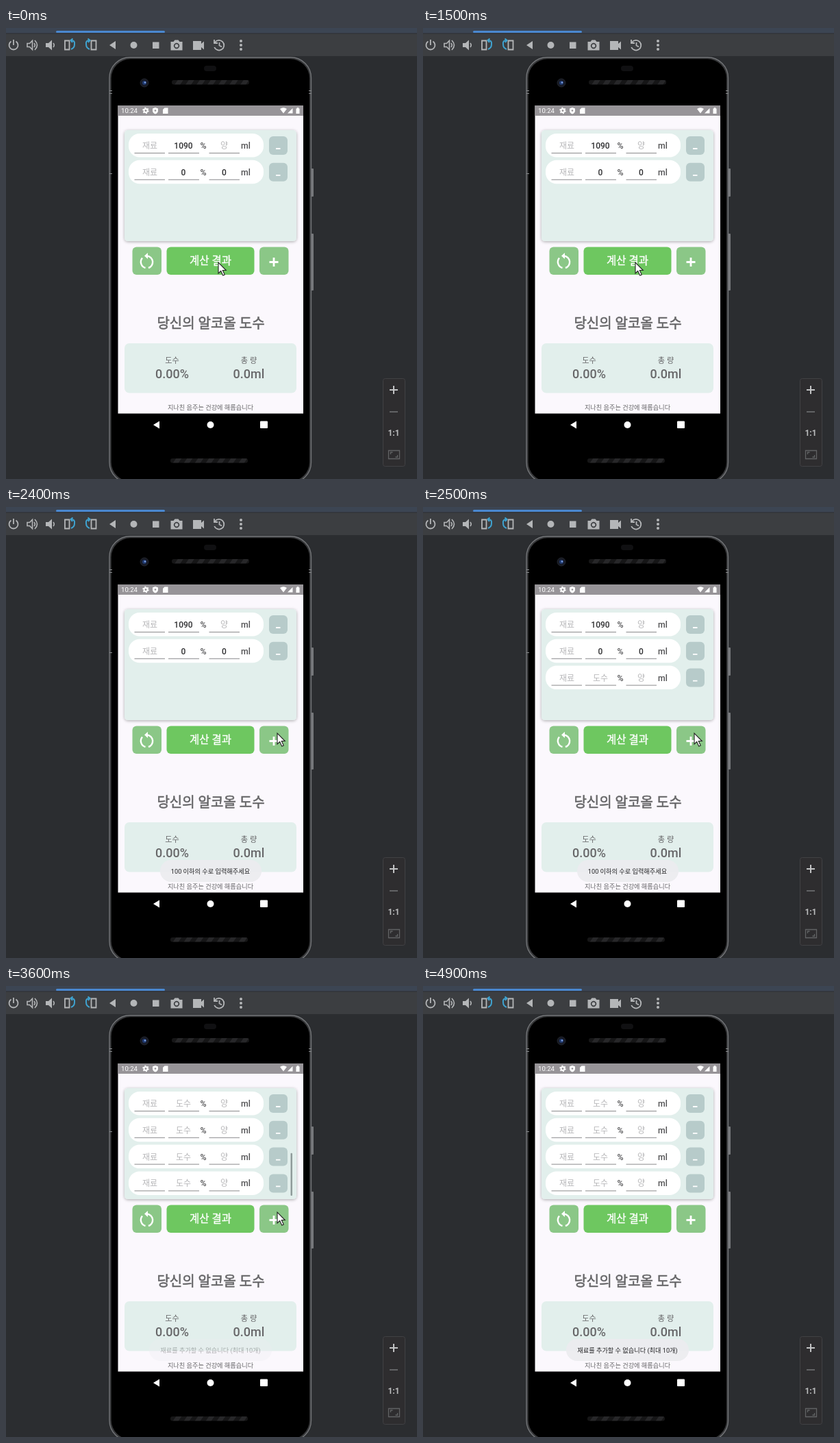
An HTML page for the animation above (5000 ms loop, 600x658 px).

```html
<!DOCTYPE html>
<html lang="ko">
<head>
<meta charset="utf-8">
<style>
html, body { margin: 0; width: 100%; height: 100%; overflow: hidden; background: #2b2d30; }
svg { display: block; }
text { font-family: Roboto, 'Noto Sans CJK KR', 'Noto Sans CJK', sans-serif; text-anchor: middle; }
.card { fill: #e2efec; }
.tools { fill: none; stroke: #b4b6b8; stroke-width: 1.8; }
.tools .solid { fill: #b4b6b8; stroke: none; }
.tools .blue { stroke: #3fa3d0; stroke-width: 2; }
.hint { fill: #b7b7b9; font-size: 12px; }
.num { fill: #303032; font-size: 12px; font-weight: 500; }
.unit { fill: #505052; font-size: 12.3px; font-weight: 500; text-anchor: start; }
.grey { fill: #676769; }
.toast { font-size: 9.2px; fill: #252527; }
</style>
</head>
<body>
<svg width="600" height="658" viewBox="0 0 600 658">
  <defs>
    <filter id="shade" x="-5%" y="-5%" width="110%" height="112%">
      <feDropShadow dx="0" dy="1" stdDeviation="2.2" flood-opacity=".32"/>
    </filter>
    <pattern id="mesh" width="16" height="7" patternUnits="userSpaceOnUse" patternTransform="skewX(-35)">
      <rect width="16" height="7" fill="#161617"/><rect width="8" height="7" fill="#272729"/>
    </pattern>
    <clipPath id="list"><rect x="173" y="149" width="251" height="162" rx="5"/></clipPath>
  </defs>

  <rect width="600" height="658" fill="#2b2d30"/>
  <rect width="600" height="8" fill="#3c4553"/>
  <rect y="8" width="600" height="33" fill="#3c3e41"/>
  <rect y="7.5" width="600" height="1" fill="#2d2f32"/>
  <rect x="73" y="4" width="159" height="3" rx="1.5" fill="#4a88d0"/>

  <g class="tools">
    <path d="M7.500 19.500a6.500 6.500 0 1 0 7 0M11 17v8"/>
    <path d="M31 22.500h3.500l4-4v13l-4-4h-3.500z" stroke-width="1.600"/>
    <path class="solid" d="M58 22h4l5-4.500v15l-5-4.500h-4z"/>
    <path d="M41 22q2.500 3 0 6M42 18q7 7 0 14M69 22q2.500 3 0 6" stroke-width="1.600"/>
    <path d="M86 18.500h6.500v13h-6.500zM124.500 18.500h7v13h-7z"/>
    <path class="blue" d="M95 18q6 0 5 6 0 5-5 7M97 21l-2.500-3 3-2.500M122 18q-6 0-5 6 0 5 5 7M120 21l2.500-3-3-2.500"/>
    <path class="solid" d="M151 25l9-6v12zM214 20.500h9.500v9.500h-9.500z"/>
    <circle class="solid" cx="186.500" cy="25" r="5"/>
    <path class="solid" fill-rule="evenodd" d="M240.500 20h4l2-2.500h5l2 2.500h4v12.500h-17zM249 21.800a4.200 4.200 0 1 0 .1 0z"/>
    <circle class="solid" cx="249" cy="26" r="2.500"/>
    <path class="solid" d="M273 19h12v4l4-3.500v12l-4-3.500v4h-12z"/>
    <path d="M305 21a7.300 7.300 0 1 1-.8 7M304 17v5h5M311.500 21v4.500l3.500 2"/>
    <g class="solid"><circle cx="343" cy="19" r="2"/><circle cx="343" cy="25" r="2"/><circle cx="343" cy="31" r="2"/></g>
  </g>

  <!-- phone -->
  <g fill="#77797c">
    <rect x="445.500" y="205" width="3.500" height="41" rx="1"/>
    <rect x="445.500" y="300" width="3.500" height="83" rx="1"/>
  </g>
  <rect x="151" y="42.800" width="294.500" height="621" rx="30" fill="#37383a" stroke="#727477" stroke-width="1.400"/>
  <rect x="153.700" y="45.300" width="289.300" height="616" rx="28" fill="#000"/>
  <path d="M151 91.500h4M151 95.500h4M442 91.500h4M442 95.500h4M151 212.500h4" stroke="#8b8d8f"/>
  <rect x="289" y="55" width="18" height="8" rx="4" fill="#101012"/>
  <circle cx="202" cy="80" r="6" fill="#171a24" stroke="#22252d"/>
  <circle cx="202" cy="80" r="3" fill="#203a70"/><circle cx="203" cy="79.500" r="1.300" fill="#81a5e5"/>
  <rect x="242" y="76" width="113" height="6.500" rx="3" fill="url(#mesh)"/>
  <rect x="240" y="628" width="113" height="6.500" rx="3" fill="url(#mesh)"/>

  <!-- screen -->
  <rect x="163.500" y="113" width="270.500" height="449.500" fill="#fbf8fd"/>
  <rect x="163.500" y="113" width="270.500" height="15" fill="#979498"/>
  <text x="180" y="124.300" font-size="9.600" fill="#fff">10:24</text>
  <g fill="#fff">
    <circle cx="204" cy="120.500" r="2.500" fill="none" stroke="#fff" stroke-width="2"/>
    <circle cx="204" cy="120.500" r="4" fill="none" stroke="#fff" stroke-width="1.500" stroke-dasharray="2 2.190"/>
    <path d="M218 116l4 1.500v3q0 3.500-4 5-4-1.500-4-5v-3zM231.500 116.500h5v8.500h-7.500v-6zM400 118q5-3.500 10 0l-5 6.500zM411 124.500l7.500-7.500v7.500zM423.500 117.500h1.200v-1.200h2.600v1.200h1.200v7.500h-5z"/>
    <circle cx="218" cy="120.500" r="1.300" fill="#979498"/>
    <path d="M215 579l9-5.500v11z"/><circle cx="298.500" cy="579" r="5"/><rect x="371" y="573.500" width="11" height="10.500" rx="1"/>
  </g>
  <rect class="card" x="173" y="149" width="251" height="162" rx="5" filter="url(#shade)"/>
  <g id="rows" clip-path="url(#list)"></g>
  <rect id="bar" x="415.500" width="2.500" rx="1" fill="#8f9c9b"/>

  <rect x="184.500" y="319.500" width="42.500" height="40.500" rx="6" fill="#8bc787"/>
  <rect x="234.500" y="319.500" width="128" height="40.500" rx="6" fill="#6ec760"/>
  <rect x="370" y="319.500" width="42.500" height="40.500" rx="6" fill="#8bc787"/>
  <g fill="none" stroke="#fff" stroke-width="2.400">
    <path d="M206 332.500a9 9 0 0 1 2 17.500M203.500 350a9 9 0 0 1-4.500-14.500"/>
    <path d="M384.500 341.500h13M391 335v13" stroke-width="2.800"/>
  </g>
  <path d="M207 328v9l-5-4.500z" fill="#fff"/>
  <text x="298.500" y="344.500" font-size="15.500" fill="#fff" stroke="#fff" stroke-width=".35">계산 결과</text>

  <rect class="card" x="173" y="460" width="251" height="72.500" rx="7"/>
  <g class="grey">
    <text x="299" y="437.700" font-size="20" stroke="#676769" stroke-width=".6">당신의 알코올 도수</text>
    <text x="242.500" y="488.600" font-size="11.200">도수</text>
    <text x="354.500" y="488.600" font-size="11.200">총 량</text>
    <text x="242.500" y="511" font-size="18" font-weight="500">0.00%</text>
    <text x="354.500" y="511" font-size="18" font-weight="500">0.0ml</text>
    <text x="298.500" y="556.500" font-size="9.200">지나친 음주는 건강에 해롭습니다</text>
  </g>
  <g id="limit" class="toast">
    <rect x="225" y="515" width="148" height="32" rx="16" fill="#ededf0" fill-opacity=".95"/>
    <text x="298.500" y="534.800">100 이하의 수로 입력해주세요</text>
  </g>
  <g id="full" class="toast">
    <rect x="209" y="515" width="179" height="32" rx="16" fill="#ededf0" fill-opacity=".95"/>
    <text x="298.500" y="534.800">재료를 추가할 수 없습니다 (최대 10개)</text>
  </g>

  <!-- zoom panel -->
  <rect x="550.500" y="511.500" width="32" height="128" rx="3" fill="#2e2d2f" stroke="#414144"/>
  <path d="M560 528h12M566 522v12" stroke="#c2c3c4" stroke-width="2"/>
  <path d="M560 560h12" stroke="#626365" stroke-width="2"/>
  <text x="566" y="595" font-size="12" font-weight="700" fill="#bcbdbe">1:1</text>
  <path d="M558.500 616.500h16v12h-16zM561.500 622v-3h3M571.500 623v3h-3" fill="none" stroke="#626365" stroke-width="1.300"/>

  <path id="cursor" d="M0 0v16l3.700-3.500 3 6.500 2.600-1.100-3-6.400h5z" fill="#fff" stroke="#222" stroke-width="1.100"/>
</svg>
<script>
const $ = id => document.getElementById(id);
const LOOP = 5000, STEP = 100, TOP = 149, TRACK = 157, PITCH = 38.8;
const addTimes = [2500, 2600, 2800, 2900, 3000, 3100, 3300, 3400];
// time, x, y
const path = [
  [1600, 310, 342], [1700, 352, 339], [1800, 397, 330], [2000, 385, 264], [2100, 387, 246],
  [2400, 396, 330], [4100, 396, 330], [4200, 398, 224], [4500, 404, -25]
];

const ramp = (t, a, b) => Math.min(1, Math.max(0, (t - a) / (b - a)));

function row(i, y) {
  const cell = (x, value, hint) =>
    `<text class="${value ? 'num' : 'hint'}" x="${x}" y="${y + 22}">${value || hint}</text>`;
  return `<rect x="179" y="${y}" width="197" height="34.500" rx="16" fill="#fff"/>
    ${cell(210, '', '재료')}${cell(259, ['1090', '0'][i], '도수')}${cell(318.5, ['', '0'][i], '양')}
    <text class="unit" x="283.500" y="${y + 22}">%</text><text class="unit" x="343" y="${y + 22}">ml</text>
    <path d="M187.500 ${y + 28.5}h44.500M237 ${y + 28.5}h45M296.500 ${y + 28.5}h44.500" stroke="#8a8a8c"/>
    <rect x="384" y="${y + 4}" width="27" height="27" rx="6" fill="#b7cbca"/>
    <path d="M394 ${y + 22}h6.500" stroke="#fff" stroke-width="1.800"/>`;
}

let shown = 0;
function drawRows(count) {
  if (count === shown) return;
  shown = count;
  const first = Math.max(0, count - 4);
  $('rows').innerHTML = Array.from({ length: count - first }, (_, k) =>
    row(first + k, TOP + 5 + k * PITCH)).join('');
  const thumb = TRACK * TRACK / (count * PITCH + 8);
  $('bar').setAttribute('height', thumb);
  $('bar').setAttribute('y', TOP + TRACK - thumb);
}

function cursorAt(t) {
  const next = path.findIndex(p => p[0] > t);
  if (next < 1) return path[next ? path.length - 1 : 0].slice(1);
  const a = path[next - 1], b = path[next], k = ramp(t, a[0], b[0]);
  return [1, 2].map(i => a[i] + (b[i] - a[i]) * k);
}

function frame(now) {
  const t = Math.floor(now % LOOP / STEP) * STEP;
  const count = 2 + addTimes.filter(a => t >= a).length;
  drawRows(count);
  $('bar').style.opacity = count > 4 ? 1 - ramp(t, 3900, 4200) : 0;
  $('limit').style.opacity = ramp(t, 1600, 1900) - ramp(t, 3200, 3500);
  $('full').style.opacity = ramp(t, 3500, 3800);
  $('cursor').setAttribute('transform', `translate(${cursorAt(t)})`);
  requestAnimationFrame(frame);
}
frame(0);
</script>
</body>
</html>
```
